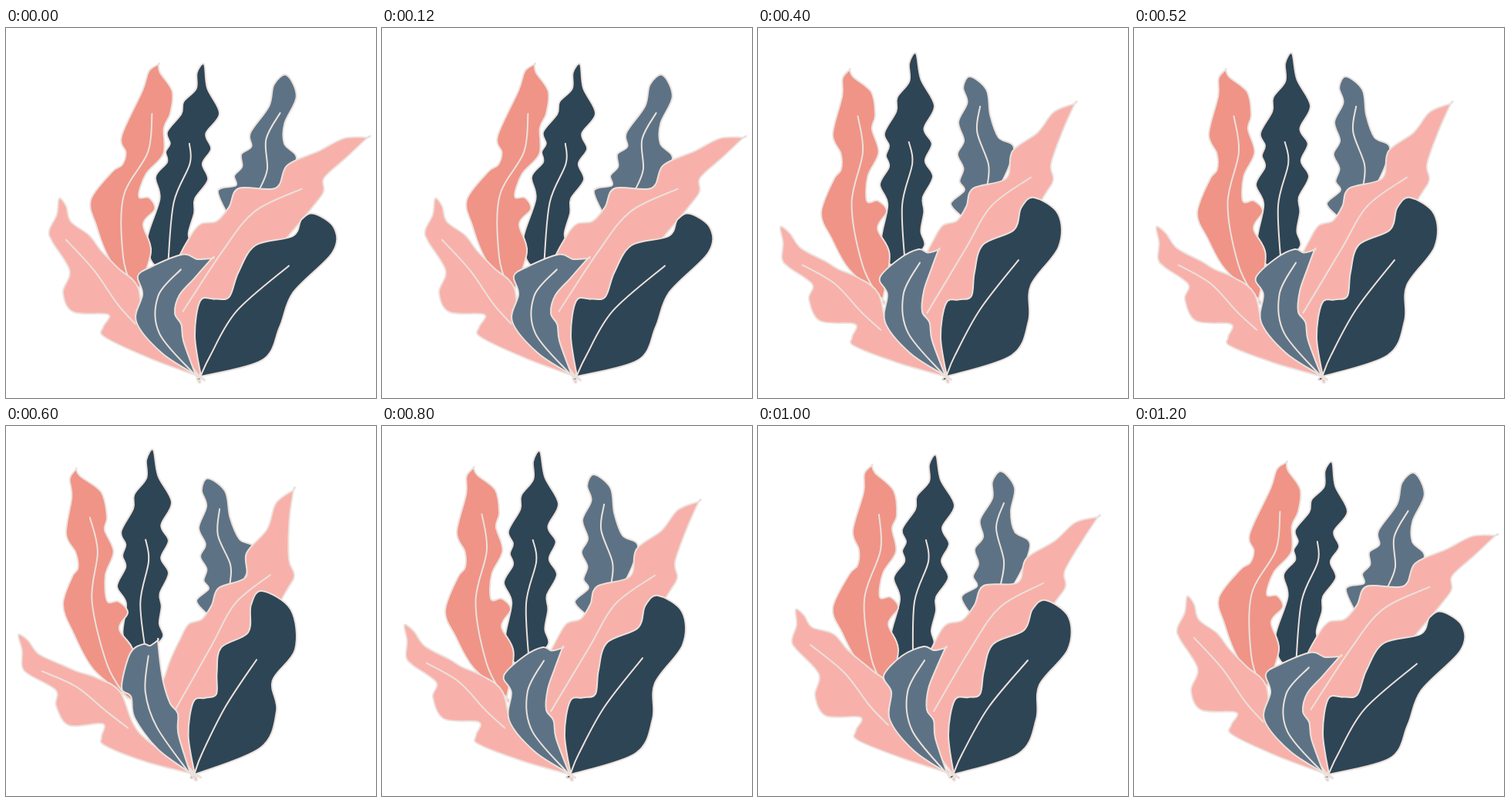
Write an HTML page with a canvas that moves like this. It is 480 by 480 pixels and loops after 1.4 s.

```html
<!DOCTYPE html>
<html lang="en">
<head>
<meta charset="utf-8">
<title>Swaying leaves</title>
<style>
html, body { margin: 0; width: 100%; height: 100%; overflow: hidden; background: #fff; }
canvas { display: block; }
</style>
</head>
<body>
<canvas id="stage" width="480" height="480"></canvas>
<script>
const ctx = document.getElementById('stage').getContext('2d');
const LINE = '#ece1dc', CORAL = '#f09487', PINK = '#f8b1aa', NAVY = '#2e4555', SLATE = '#5d7385';
const STEP = 200;
const SWAY = ['right', 'rest', 'left', 'far', 'left', 'rest', 'right'];

// "x,y" pairs; "!" marks a sharp corner, "*" a handle that bends the leaf.
const parse = text => text.split(' ').map(s => {
  const [x, y] = s.split(',').map(parseFloat);
  return { x, y, sharp: s.includes('!'), handle: s.includes('*') };
});

// Smooth curve through points; a doubled point gives a corner.
function curve(points, closed) {
  const pts = points.flatMap(p => p.sharp ? [p, p] : [p]);
  const n = pts.length;
  const at = i => closed ? pts[(i + n) % n] : pts[Math.max(0, Math.min(n - 1, i))];
  const path = new Path2D();
  path.moveTo(pts[0].x, pts[0].y);
  for (let i = 0; i < (closed ? n : n - 1); i++) {
    const a = at(i - 1), b = at(i), c = at(i + 1), d = at(i + 2);
    path.bezierCurveTo(
      b.x + (c.x - a.x) / 6, b.y + (c.y - a.y) / 6,
      c.x - (d.x - b.x) / 6, c.y - (d.y - b.y) / 6,
      c.x, c.y);
  }
  if (closed) path.closePath();
  return path;
}

// Moving least squares: locally a turn and a scale, exact at the handles.
function bend(v, from, to) {
  const w = from.map(p => 1 / ((p.x - v.x) ** 2 + (p.y - v.y) ** 2 + 1e-6));
  const sum = w.reduce((a, b) => a + b);
  const mean = (pts, k) => pts.reduce((s, p, i) => s + w[i] * p[k], 0) / sum;
  const px = mean(from, 'x'), py = mean(from, 'y');
  const qx = mean(to, 'x'), qy = mean(to, 'y');
  let re = 0, im = 0, size = 0;
  from.forEach((p, i) => {
    const ax = p.x - px, ay = p.y - py, bx = to[i].x - qx, by = to[i].y - qy;
    re += w[i] * (ax * bx + ay * by);
    im += w[i] * (ax * by - ay * bx);
    size += w[i] * (ax * ax + ay * ay);
  });
  const dx = v.x - px, dy = v.y - py;
  return {
    x: qx + (re * dx - im * dy) / size,
    y: qy + (im * dx + re * dy) / size,
    sharp: v.sharp
  };
}

function leaf(color, outline, vein, bends) {
  const edge = parse(outline), rib = parse(vein);
  const from = edge.filter(p => p.handle);
  const poses = { rest: [curve(edge, true), curve(rib, false)] };
  for (const name in bends) {
    const to = parse(bends[name]);
    const warp = pts => pts.map(p => bend(p, from, to));
    poses[name] = [curve(warp(edge), true), curve(warp(rib), false)];
  }
  return { color, poses };
}

const tallNavy = leaf(NAVY,
  '231,38* 237,70 255,103* 239,132 248,153 238,175 247,197* 231,222 231,240 225,265 228,285 205,303 183,307* 172,275 184,225 176,197* 190,176 187,162 192,150 187,134 204,108 206,91 222,72 222,50',
  '218,148 221,176 203,228 201,303', {
    right: '257,47 277,111 262,197 192,307 194,193',
    left: '205,33 229,101 227,193 173,308 158,203',
    far: '191,31 215,99 211,191 165,297 144,208'
  });

const coral = leaf(CORAL,
  '148,51!* 152,61 176,84 180,116* 174,133 179,163 162,191 158,222 172,222 182,236* 169,257 182,290 170,345!* 130,306 109,268 97,236* 118,193 129,181 131,161 123,136* 137,86 138,62',
  '157,115 159,161 138,225 147,301 165,342', {
    right: '198,47 213,111 193,235 170,345 110,223 150,140',
    left: '119,54 152,113 167,238 162,352 82,240 97,138',
    far: '91,56 131,118 158,242 163,356 74,232 78,140'
  });

const slate = leaf(SLATE,
  '316,59* 333,80 328,111 333,137* 353,156 325,215 278,247!* 264,222* 284,208 279,195 286,179 281,160 292,144 288,122* 304,94 304,72',
  '319,100 309,132 319,175 315,205', {
    right: '364,61 361,150 288,243 275,211 317,136',
    left: '275,63 312,142 266,246 250,228 260,122',
    far: '262,68 303,147 263,246 247,227 250,132'
  });

const pink = leaf(PINK,
  '441,118!* 412,125 385,149 348,172* 337,203 293,207* 281,232 265,252 245,257* 232,275 215,315 205,380 253,452!* 280,390 315,325 385,229 399,208* 398,188 420,150',
  '370,204 314,235 275,290 228,370', {
    right: '469,142 365,178 302,208 253,254 250,452 412,212',
    left: '411,98 330,160 279,208 240,256 245,452 383,197',
    far: '373,83 312,165 276,210 237,257 245,452 374,194'
  });

const roundNavy = leaf(NAVY,
  '373,226* 403,248 402,290* 365,336 361,380* 338,425 254,452!* 247,400 255,356* 272,352 288,348 293,318 305,283 345,265* 356,238',
  '350,304 299,365 265,425 254,450', {
    right: '400,241 423,292 355,388 253,452 252,354 372,270',
    left: '358,220 390,284 351,380 245,452 244,357 332,262',
    far: '332,214 375,290 351,370 245,452 243,358 314,268'
  });

const lowPink = leaf(PINK,
  '49,238* 60,246 70,261 98,270* 118,292 148,317* 173,340 185,395 253,452!* 190,432 130,408 127,395* 133,378 88,376 74,350* 79,322 50,290 44,278 50,258',
  '68,284 112,320 145,363 169,388', {
    right: '69,221 108,269 146,312 250,452 126,388 74,343',
    left: '29,258 88,303 130,324 243,452 122,401 66,352',
    far: '16,271 73,310 118,327 245,452 124,403 65,363'
  });

const smallSlate = leaf(SLATE,
  '243,288!* 231,315 221,341 219,368* 228,382 230,405 245,450!* 202,421 171,381* 173,345 163,324* 187,298* 215,286 228,291',
  '216,304 194,345 200,395 243,449', {
    right: '267,299 219,370 246,450 169,381 171,322 188,310',
    left: '234,288 213,368 243,451 165,382 158,324 184,299',
    far: '197,278 213,360 239,450 167,379 150,339 161,295'
  });

const plant = [tallNavy, coral, slate, pink, roundNavy, lowPink, smallSlate];

ctx.lineCap = ctx.lineJoin = 'round';
ctx.strokeStyle = LINE;
ctx.lineWidth = 2;

function draw(now) {
  const pose = SWAY[Math.floor(now / STEP) % SWAY.length];
  ctx.fillStyle = '#fff';
  ctx.fillRect(0, 0, 480, 480);
  for (const { color, poses } of plant) {
    const [edge, rib] = poses[pose];
    ctx.fillStyle = color;
    ctx.fill(edge);
    ctx.stroke(edge);
    ctx.stroke(rib);
  }
  requestAnimationFrame(draw);
}
requestAnimationFrame(draw);
</script>
</body>
</html>
```
